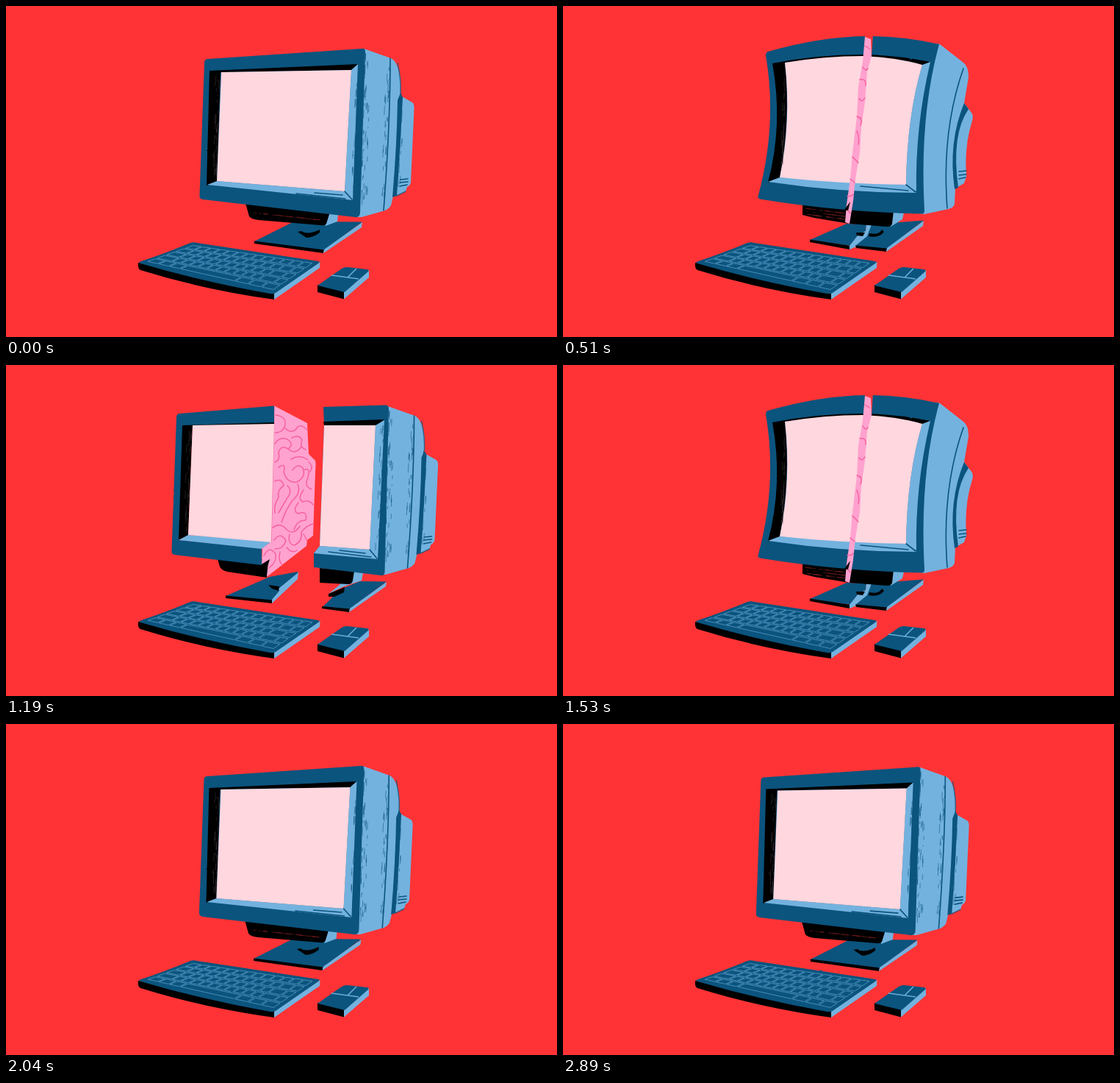
An HTML page that plays this animation: 750x450 px, repeating every 3.06 s.

```html
<!DOCTYPE html>
<html lang="en">
<head>
<meta charset="utf-8">
<title>Split computer</title>
<style>
  html, body { margin: 0; width: 100%; height: 100%; overflow: hidden; background: #ff3335; }
  svg { display: block; width: 750px; height: 450px; }
  .d { fill: #0b547e; }
  .l { fill: #73b2df; }
  .s { fill: #ffd7df; }
  .p { fill: #ffa2cf; }
  .r { fill: #ff3335; }
  .line { fill: none; stroke: #0b547e; stroke-width: 1.6; stroke-linecap: round; }
  .fold { fill: none; stroke: #f5639f; stroke-width: 1.5; stroke-linecap: round; }
  .key { fill: none; stroke: #69abd8; stroke-width: .8; stroke-linejoin: round; }
</style>
</head>
<body>
<svg viewBox="0 0 750 450">
  <defs>
    <filter id="rough" filterUnits="userSpaceOnUse" x="0" y="0" width="750" height="450" color-interpolation-filters="sRGB">
      <feTurbulence id="noise" type="fractalNoise" baseFrequency=".09" numOctaves="2" seed="1"/>
      <feDisplacementMap in="SourceGraphic" scale="1.4" xChannelSelector="R" yChannelSelector="G"/>
    </filter>
    <g id="side">
      <path class="l" d="M484 58L490 59L524 71Q534 76 537 100V122L553 131Q556 133 555.5 140L551 240Q550 244 546 246L544 252L533 257L527 259L524 271Q522 275 516 278L484 287L478 287Z"/>
      <path class="d" d="M537 118L540 124Q537 190 532 258L526 260Q532 190 533 128Z"/>
      <path class="line" d="M523 71Q523 160 514 278M537 236L547 235M536 240L547 239M536 245L546 243"/>
      <path class="line" stroke-opacity=".7" d="M533 78Q538 100 537 120M544 252L532 258"/>
    </g>
  </defs>
  <rect class="r" width="750" height="450"/>
  <g filter="url(#rough)">

    <g id="foot">
      <path class="d" d="M338 320L392 293L485 293.5L433 332Z"/>
      <path d="M338 319.5L433 331.5L432 336L338 323Z"/>
      <path class="l" d="M485 294L484 301L432 336L433 331Z"/>
      <path d="M397 307L402 306Q410 312 427 304L427 308Q418 315 409 315Z"/>
      <path class="l" d="M434 280L452 284L451 293L435 299Z"/>
      <path d="M326 268L441 280L436 296Q434 299 428 298L344 291Q334 290 331 286Z"/>
    </g>
    <g id="shut">
      <use href="#side"/>
      <path class="d" d="M270 77Q270 72 275 72L484 58Q489 57 489 62L482 282Q481 288 475 287L268 263Q263 262 263.5 257Z"/>
      <path d="M277 88L479 79L470 87L292 90L287 239L273 244Z"/>
      <path class="l" d="M479 79L470 87L461 252L287 238L274 243L472 264Z"/>
      <path class="s" d="M293 90L470 87L461 252L287 238Z"/>
      <path class="line" d="M461 252L471 263M395 255L462 262M420 254L458 257"/>
    </g>

    <g id="bentFoot">
      <path class="d" d="M336 318L386 296L413 297L412 306L402 311L391 326Z"/>
      <path d="M336 317.5L391 326L390 331L336 321Z"/>
      <path class="l" d="M390 326L402 311L412 306L413 297H421L418 314L402 326L390 331Z"/>
      <path class="d" d="M420 297L491 291.5L441 330L398 326L414 313Z"/>
      <path d="M398 325.5L441 329.5L440 334L399 329Z"/>
      <path class="l" d="M491 292L490 299L440 334L441 329Z"/>
      <path d="M399 308L411 308L408 313L400 312ZM417 309Q430 312 434 304L437 307Q430 316 416 313Z"/>
      <path class="l" d="M448 277L464 281L462 290L446 300Z"/>
      <path d="M326 267L450 278L448 296Q447 300 441 300L390 296L342 288L326 284Z"/>
    </g>
    <g id="bent">
      <path class="l" d="M508 51L513 52L545 77Q552 82 552 97L546 132L556 145Q559 149 557 156Q546 190 549 232L546 241L534 248L533 269Q532 274 525 276L492 283L485 282Q470 150 508 51Z"/>
      <path class="d" d="M546 132L552 140Q528 175 538 247L533 249Q524 185 546 132Z"/>
      <path class="line" d="M545 85Q515 170 523 275M539 225L549 224M539 230L549 229M539 235L548 233"/>
      <path class="d" d="M276 67Q276 62 281 61.5Q350 42 411 41H421Q470 42 512 52Q485 150 492 278Q492 283 488 282.5Q375 280 268 262.5Q264 261 266 257Q292 160 276 67Z"/>
      <path d="M285 78Q350 65 418 66Q460 68 500 76L489 81Q400 64 302 77Q310 155 295 234L279 240Q300 160 285 78Z"/>
      <path class="l" d="M500 76L489 80Q468 150 467 243L295 233L279 239Q380 254 481 254Q479 165 500 76Z"/>
      <path class="s" d="M302 77Q355 68 409 68Q455 70 489 80Q468 150 467 243Q380 242 295 233Q311 155 302 77Z"/>
      <path class="line" d="M467 243L480 253M405 245L470 251"/>
    </g>
    <g id="crack">
      <path class="r" d="M411 38H422L420 68L410 80Z"/>
      <path class="p" d="M411 42L419 45L420 68L414 90L411 130L406 165L404 200L398 235L395 265L390 296L384 294L386 270L391 235L394 200L400 150L402 110L408 75Z"/>
      <path class="fold" d="M411 54L417 58M408 83Q412 90 415 85M404 100Q413 98 412 108M403 126Q407 132 411 125M400 150Q409 153 405 162M400 170Q404 180 402 188M394 205L402 213M391 235L397 240M387 258Q392 260 395 256M386 276L391 282"/>
      <path d="M383 277L391 266L388 278Z"/>
    </g>

    <g id="left">
      <path class="d" d="M299 314L359 288L397 281V290L363 321Z"/>
      <path d="M299 313.5L362 319.5V324L299 317Z"/>
      <path class="l" d="M398 282L397 291L362 324V319L372 307L371 304Z"/>
      <path d="M357 299L372 301L371 307L362 304Z"/>
      <path d="M288 264L358 264L355 289L301 281Q293 279 291 274Z"/>
      <path class="p" d="M365 55.5L410 79L412 121L421 130Q422 134 421 145L418 232L410 238L409 246L355 288L357 266L348 271L349 249L361 240Z"/>
      <path class="fold" d="M365 56L361 240M367 68Q382 70 380 82Q376 93 366 92M379 85Q390 96 397 84Q402 80 410 88M366 107Q372 97 383 101Q393 108 384 114Q374 108 371 119Q374 129 366 132M389 99Q399 94 403 102Q399 112 408 115M384 114Q394 123 402 111M371 139Q382 132 378 145Q382 161 396 159Q409 152 404 140Q397 133 390 143M388 128Q399 121 411 129M405 143Q415 138 411 153Q405 165 416 169M412 132Q419 137 414 145M366 158Q375 153 378 164Q369 169 371 180Q364 191 366 201M383 164Q391 171 382 182L371 201M397 162Q402 174 390 184Q380 198 375 214M405 170Q396 182 404 186Q413 183 418 190M398 187Q389 199 398 202Q411 197 408 211Q396 211 392 224M363 221Q374 213 382 224Q392 232 400 219M365 238Q374 226 381 239Q377 251 366 250M386 230Q383 244 393 245Q404 239 402 227Q408 219 418 216M351 260Q358 244 367 257Q369 268 358 276M373 254Q370 266 376 272M382 248Q389 257 396 252M405 230L410 239"/>
      <path class="d" d="M232 71Q232 66 237 66L365 55.5V80L241 83L236 238L348 249V272L229 258Q225 257 225.5 252Z"/>
      <path d="M240 82L365 78V81L254 82L248 232L235 238Z"/>
      <path class="l" d="M235 238L248 231L361 240L348 250Z"/>
      <path class="s" d="M254 82L365 80L361 241L248 231Z"/>
      <path d="M348 271L359 264L356 274Z"/>
    </g>

    <g id="right">
      <path class="d" d="M432 329L456 305L483 294L519 294.5L469 332Z"/>
      <path d="M431 328L469 331.5L468 336L431 331Z"/>
      <path class="l" d="M519 295L518 301L468 336L469 331Z"/>
      <path class="l" d="M470 280L487 283L485 293L461 301L440 311L455 299Z"/>
      <path d="M440 311L462 302L461 309L448 315L440 315Z"/>
      <path d="M428 276L475 280L473 293Q472 298 467 298L428 296Z"/>
      <use href="#side" x="33.5" y="-2"/>
      <path class="d" d="M433 57L517 54.5Q522 54 522 60L516.5 282Q516 287 511 286L420 275V256L428 246L434 80Z"/>
      <path d="M433 77L516 74L504 83L434 82Z"/>
      <path class="l" d="M516 75L504 82L496 251L428 246L420 256L507 264Z"/>
      <path class="s" d="M434 82L504 82L496 251L428 246Z"/>
      <path class="line" d="M496 251L506 263M440 254L498 261M455 252L490 256"/>
    </g>

    <g id="desk">
      <path d="M180 349Q179 357 183 359Q270 386 365 399L367 388Z"/>
      <path class="l" d="M427.5 348L427 356L365 399V390Z"/>
      <path class="d" d="M181 348Q215 337 251 322Q255 320.5 260 322L425 347Q428 348 425 350L367 390Q364 392 359 391Q265 374 183 350Z"/>
      <path d="M424 379L461 387L460 398.5L424 389Z"/>
      <path class="l" d="M494 359V369L460 398.5V387Z"/>
      <path class="d" d="M424 380L457 357Q460 355 464 355L491 358Q495 359 493 361L461 389Z"/>
      <path class="key" style="stroke-width:1.6" d="M443 366L480 371M477 357L465 369"/>
    </g>
  </g>
</svg>
<script>
  const $ = id => document.getElementById(id);
  let seed = 7;
  const rand = () => (seed = seed * 16807 % 2147483647) / 2147483647;

  function addPath(parent, attrs) {
    const path = document.createElementNS('http://www.w3.org/2000/svg', 'path');
    for (const name in attrs) path.setAttribute(name, attrs[name]);
    $(parent).append(path);
  }

  // Dry-brush marks, densest along the line from (x1,y1) to (x2,y2).
  function scratch(parent, x1, y1, x2, y2, spread, count, color) {
    const length = Math.hypot(x2 - x1, y2 - y1);
    let d = '';
    for (let i = 0; i < count; i++) {
      const a = rand() * .95, b = Math.min(1, a + (2 + rand() * 11) / length);
      const off = rand() ** 2 * spread;
      const at = k => `${x1 + (x2 - x1) * k + off} ${y1 + (y2 - y1) * k}`;
      d += `M${at(a)}L${at(b)}`;
    }
    addPath(parent, { d, fill: 'none', stroke: color, 'stroke-width': .55 });
  }

  const dark = '#0b547e', dust = '#3f343b', rust = '#8a2228';
  scratch('side', 489, 64, 483, 280, 8, 50, dark);
  scratch('side', 523, 78, 514, 272, -5, 30, dark);
  scratch('side', 536, 130, 530, 250, 6, 25, dark);
  scratch('shut', 291, 94, 286, 234, -7, 40, dust);
  scratch('shut', 480, 85, 473, 258, -4, 25, dark);
  scratch('bent', 303, 95, 299, 220, -4, 30, dust);
  scratch('left', 253, 86, 247, 229, -6, 35, dust);
  scratch('right', 516, 80, 508, 255, -5, 30, dark);
  scratch('foot', 335, 281, 428, 291, 4, 18, rust);
  for (const y of [275, 279, 283]) scratch('bentFoot', 329, y, 383, y + 7, 3, 12, rust);

  function drawKeys() {
    const point = (u, v) => {
      const x = (1 - v) * (255 + 164 * u) + v * (191 + 173 * u);
      const y = (1 - v) * (325 + 24 * u) + v * (347.5 + 39 * u);
      return `${x.toFixed(1)} ${y.toFixed(1)}`;
    };
    const rows = 5;
    let d = '';
    for (let r = 0; r < rows; r++) {
      const widths = r === rows - 1 ? [1, 1, 1, 5, 1.2, 1.2, 1.2]
        : Array.from({ length: 13 }, (_, i) => i === 0 || i === 11 ? 1 + r * .25 : 1);
      const total = widths.reduce((a, b) => a + b);
      const top = (r + .1) / rows, bottom = (r + .9) / rows;
      let u = 0;
      for (const w of widths) {
        const a = u + .006, b = (u += w / total) - .006;
        d += `M${point(a, top)}L${point(b, top)}L${point(b, bottom)}L${point(a, bottom)}Z`;
      }
    }
    addPath('desk', { d, class: 'key', opacity: .8 });
  }
  drawKeys();

  const still = 'translate(0 0)';
  const rest = transform => ({ foot: transform, shut: transform });
  const restA = rest(still);
  const restB = rest('matrix(.995 0 0 1 .8 -1)');
  const restC = rest('matrix(.992 0 0 .998 1.5 .6)');
  const tall = { foot: still, shut: 'matrix(1 0 0 1.078 0 -22.4)' };
  const taller = { foot: still, bent: 'matrix(.96 0 0 1.087 15.6 -24.5)' };
  const cracked = { bentFoot: still, bent: still, crack: still };
  const wide = { left: 'translate(-14 -3)', right: 'translate(17 -4)' };
  const apart = (x, y) => ({ left: `translate(0 ${y})`, right: `translate(${x} ${y})` });

  const poses = [
    restA, tall, taller, cracked, wide,
    apart(0, 0), apart(.5, -1), apart(-1, 0),
    wide, cracked, taller, tall,
    restB, restA, restC, restB, restA, restC
  ];
  const parts = ['foot', 'shut', 'bentFoot', 'bent', 'crack', 'left', 'right'];
  const step = 170;
  const start = performance.now();
  let shown = -1;

  function show(index) {
    shown = index;
    for (const part of parts) {
      const transform = poses[index][part];
      $(part).style.display = transform ? '' : 'none';
      if (transform) $(part).setAttribute('transform', transform);
    }
    $('noise').setAttribute('seed', 1 + index % 3);
  }

  function loop() {
    const index = Math.floor((performance.now() - start) / step) % poses.length;
    if (index !== shown) show(index);
    requestAnimationFrame(loop);
  }
  loop();
</script>
</body>
</html>
```
